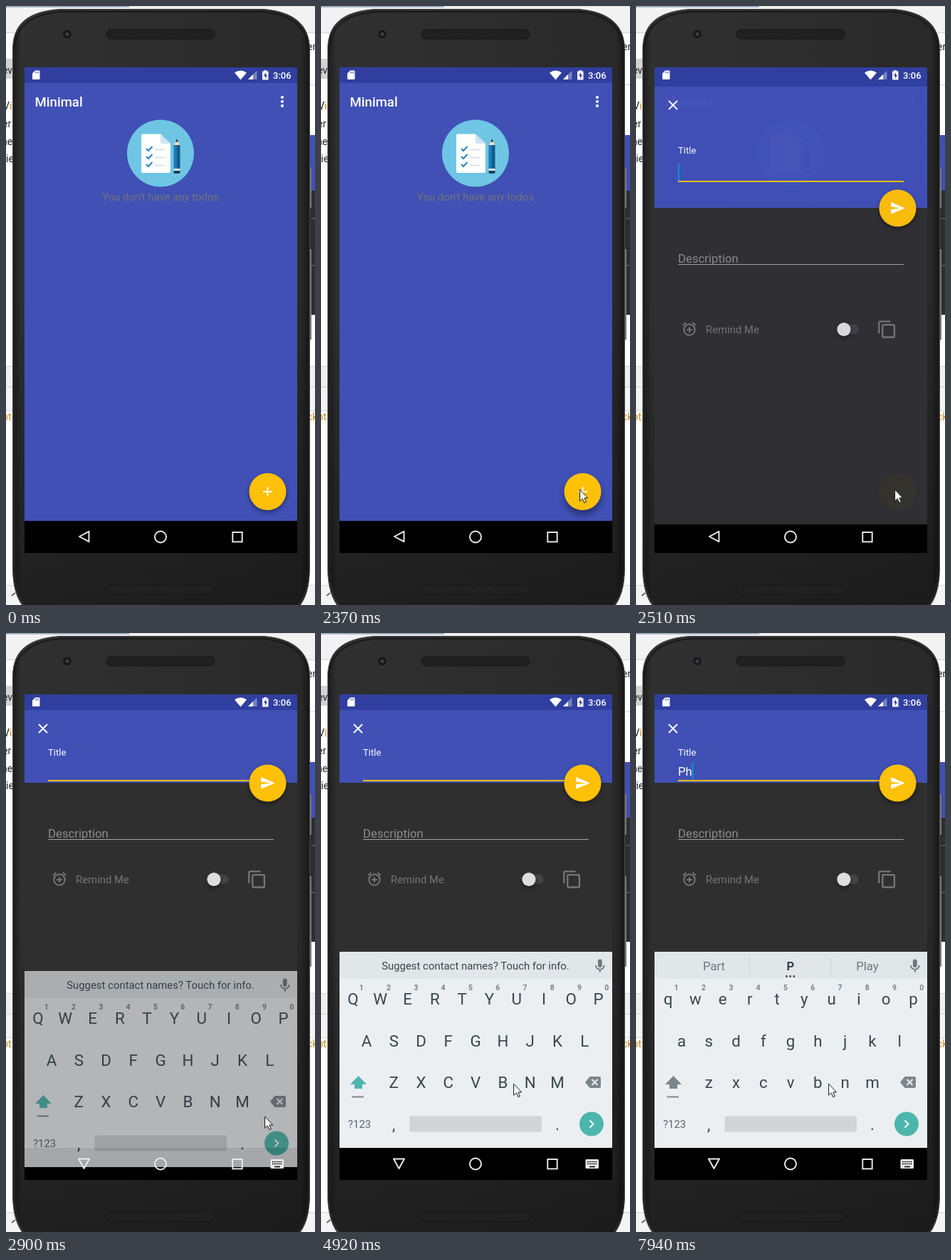
These frames come from a looping animation (434x840 px, 8 s). An HTML page:

```html
<!DOCTYPE html>
<html lang="en">
<head>
<meta charset="utf-8">
<title>Todo demo</title>
<style>
html, body { margin: 0; width: 100%; height: 100%; overflow: hidden; background: #fff; }
svg { display: block; width: 434px; height: 840px; }
text { font-family: Roboto, sans-serif; }
.mid { text-anchor: middle; }
.ide { font: 14px "Open Sans", sans-serif; }
.key { font-size: 22.4px; fill: #37474f; text-anchor: middle; }
.hint { font-size: 10.5px; font-weight: 700; fill: #75828a; text-anchor: middle; }
.sp14 { font-size: 13.04px; }
.sp16 { font-size: 14.9px; }
.sp18 { font-size: 16.77px; }
.fab { filter: drop-shadow(0 3px 3px #0006); }

/* every moving part shares one 8 s clock */
.a { animation: 8s step-end infinite; }
.lift { animation-name: lift; }
#form { animation-name: open; }
#keyboard { animation-name: rise; }
#caret { animation-name: blink; }
#caretX { animation-name: advance; }
#upper { animation-name: upper; }
.lower { animation-name: lower; }
#second { animation-name: second; }
#navBack { animation-name: navBack; }
#navDown { animation-name: navDown; }
#click { animation-name: click; }
#add { animation-name: press; }
#ripple { animation-name: ripple; }
#cursor { animation-name: point; }

@keyframes lift { 0% { transform: translateY(var(--d)); } 36.25%, 100% { transform: none; } }
@keyframes open {
  0% { opacity: 0; transform: translateY(54px); }
  30.375% { opacity: .69; transform: translateY(25px); }
  31.375% { opacity: .97; transform: translateY(5px); }
  33.5%, 100% { opacity: 1; transform: none; }
}
@keyframes rise {
  0% { opacity: 0; transform: translateY(60px); }
  36.25% { opacity: .7; transform: translateY(27px); }
  37.25% { opacity: .95; transform: translateY(6px); }
  38.25%, 100% { opacity: 1; transform: none; }
}
@keyframes blink {
  0%, 42.25%, 54.625%, 67.125%, 80%, 92.625%, 100% { opacity: 1; }
  36.25%, 48.25%, 61.5%, 73.125%, 86.625% { opacity: 0; }
}
@keyframes advance {
  0% { transform: none; }
  98.375% { transform: translateX(10.5px); }
  99.25%, 100% { transform: translateX(19.6px); }
}
@keyframes upper { 0% { opacity: 1; } 98.375%, 100% { opacity: 0; } }
@keyframes lower { 0% { opacity: 0; } 98.375%, 100% { opacity: 1; } }
@keyframes second { 0% { opacity: 0; } 99.25%, 100% { opacity: 1; } }
@keyframes navBack { 0% { opacity: 1; } 34.375%, 100% { opacity: 0; } }
@keyframes navDown { 0% { opacity: 0; } 34.375%, 100% { opacity: 1; } }
@keyframes click { 0%, 17.875%, 100% { opacity: 0; } 15.75% { opacity: 1; } }
@keyframes press {
  0% { filter: drop-shadow(0 3px 3px #0006); }
  23.75% { filter: drop-shadow(0 4px 4px #0006); }
  25.5%, 100% { filter: drop-shadow(0 6px 5px #0006); }
}
@keyframes ripple {
  0% { opacity: 0; transform: scale(0); }
  23.75% { opacity: .25; transform: scale(.2); animation-timing-function: steps(3); }
  26.5% { opacity: .25; transform: scale(1); animation-timing-function: steps(3); }
  29.5%, 100% { opacity: 0; transform: scale(1); }
}
@keyframes point {
  0% { transform: translate(445px, 810px); }
  2.25% { transform: translate(426px, 786px); animation-timing-function: steps(6); }
  7.5% { transform: translate(383px, 690px); animation-timing-function: steps(4); }
  11% { transform: translate(365px, 671px); }
  11.875% { transform: translate(363px, 677.5px); }
  43.125% { transform: translate(363px, 677.5px); animation-timing-function: steps(4); }
  46.875% { transform: translate(306px, 495.5px); animation-timing-function: steps(5); }
  51.75%, 100% { transform: translate(270px, 631.5px); }
}
</style>
</head>
<body>
<svg viewBox="0 0 434 840">
  <defs>
    <linearGradient id="shell" x2="1">
      <stop offset="0" stop-color="#1c1c1c"/><stop offset=".03" stop-color="#303030"/>
      <stop offset=".5" stop-color="#2d2d2d"/><stop offset=".97" stop-color="#292929"/>
      <stop offset="1" stop-color="#171717"/>
    </linearGradient>
    <linearGradient id="shade" x2="0" y2="1">
      <stop offset="0" stop-color="#000" stop-opacity="0"/><stop offset="1" stop-color="#000" stop-opacity=".35"/>
    </linearGradient>
    <pattern id="mesh" width="4" height="4" patternUnits="userSpaceOnUse">
      <rect width="4" height="4" fill="#191919"/>
      <circle cx="1" cy="1" r=".8" fill="#3a3a3a"/><circle cx="3" cy="3" r=".8" fill="#3a3a3a"/>
    </pattern>
    <clipPath id="screen"><rect x="26" y="86" width="383" height="681"/></clipPath>
    <clipPath id="window"><rect x="26" y="86" width="383" height="636"/></clipPath>
    <clipPath id="disc"><circle cx="367.5" cy="681" r="26"/></clipPath>
  </defs>

  <!-- desktop behind the phone -->
  <g id="desktop">
    <rect width="434" height="840" fill="#fff"/>
    <rect width="434" height="37" fill="#f2f2f2"/>
    <rect width="173" height="2" fill="#9fb0c4"/><rect x="173" width="261" height="1" fill="#dcdcdc"/>
    <path d="M0 37.5H434M400 110.5H434M0 505.5H434M0 534.5H434M0 567.5H434M0 812.5H434" stroke="#d2d2d2"/>
    <rect y="74" width="12" height="28" fill="#d3d3d3"/>
    <rect y="506" width="434" height="28" fill="#f0f0f0"/>
    <rect y="535" width="434" height="32" fill="#f4f4f4"/>
    <rect y="813" width="434" height="27" fill="#f4f4f4"/>
    <rect x="424" y="181" width="10" height="78" fill="#4050b5"/>
    <rect x="424" y="259" width="10" height="174" fill="#2e2e2e"/>
    <path d="M429 298h5M429 364h5" stroke="#777"/>
    <path d="M427.5 226V283M427.5 341V468" stroke="#777" stroke-width="3"/>
    <g class="ide" fill="#222">
      <text x="-5" y="95">ev</text>
      <text x="-4" y="145">V<tspan fill="#c9861a">i</tspan></text>
      <text x="-5" y="170">er</text><text x="-6" y="195">ne</text><text x="0" y="219">ie</text>
      <text x="423" y="62">er</text>
      <g fill="#c9861a"><text x="-5" y="581">ot</text><text x="423" y="581">ck</text></g>
    </g>
    <path d="M8 827l5-4" stroke="#666" stroke-width="2"/>
  </g>

  <!-- phone -->
  <g id="phone">
    <path id="body" d="M9.500 60C10 27 28 8 75 4.500H362C405 8 426 27 426.500 60V790C426 815 421 832 409 846H27C15 832 10 815 9.500 790Z" fill="url(#shell)" stroke="#4a4a4a"/>
    <path d="M12 62C13 31 31 12 76 8H361C403 12 423 31 424 62" fill="none" stroke="#191919" stroke-width="2"/>
    <path d="M13 400H423V790C422 815 418 832 406 846H30C18 832 14 815 13 790Z" fill="url(#shade)"/>
    <circle cx="86" cy="39.500" r="6.500" fill="#181818" stroke="#353535"/>
    <circle cx="86" cy="39.500" r="2.500" fill="#3b4048"/>
    <g fill="url(#mesh)" stroke="#161616">
      <rect x="141" y="33" width="152" height="13" rx="6.500"/>
      <rect x="141" y="812" width="152" height="13" rx="6.500"/>
    </g>
  </g>

  <g clip-path="url(#screen)">
    <rect x="26" y="86" width="383" height="681" fill="#000"/>

    <!-- list screen -->
    <g id="home">
      <rect x="26" y="86" width="383" height="636" fill="#4050b5"/>
      <rect x="26" y="86" width="383" height="22" fill="#303f9f"/>
      <text x="40.500" y="141" font-size="18.630" font-weight="500" fill="#fff">Minimal</text>
      <g fill="#fff"><circle cx="388" cy="128" r="2.100"/><circle cx="388" cy="134" r="2.100"/><circle cx="388" cy="140" r="2.100"/></g>
      <circle cx="217" cy="206.500" r="47" fill="#6ec5e4"/>
      <path d="M192 179.500H217L231 193V232a2 2 0 0 1-2 2H192a2 2 0 0 1-2-2V181.500a2 2 0 0 1 2-2Z" fill="#fff"/>
      <path d="M217 179.500L231 193H219a2 2 0 0 1-2-2Z" fill="#cfe3f2"/>
      <g fill="none">
        <path d="M197 200l3 3 5.500-6M197 211l3 3 5.500-6M197 222l3 3 5.500-6" stroke="#2b83c4" stroke-width="2"/>
        <path d="M209 201.500h14M209 212.500h14M209 223.500h14" stroke="#d3dbe2" stroke-width="1.500"/>
      </g>
      <path d="M235.500 196L240 186 244.500 196Z" fill="#f3dcb8"/>
      <path d="M238 190.500L240 186 242 190.500Z" fill="#17324d"/>
      <rect x="235.500" y="195" width="4.500" height="34" fill="#1f7ab8"/>
      <rect x="240" y="195" width="4.500" height="34" fill="#135a8c"/>
      <rect x="235.500" y="228" width="9" height="3" fill="#dfe6ea"/>
      <path d="M235.500 231h9v2a2 2 0 0 1-2 2h-5a2 2 0 0 1-2-2Z" fill="#16405f"/>
      <text x="217" y="273" class="sp16 mid" fill="#737379">You don't have any todos</text>
      <g id="add" class="a">
        <circle cx="367.500" cy="681" r="26" fill="#ffc107"/>
        <path d="M361 681h13M367.500 674.500v13" stroke="#fff" stroke-width="1.900"/>
        <g clip-path="url(#disc)"><g transform="translate(363 678)"><circle id="ripple" class="a" r="34" fill="#fff"/></g></g>
      </g>
    </g>

    <!-- edit screen -->
    <g id="form" class="a"><g clip-path="url(#window)">
      <rect x="26" y="86" width="383" height="636" fill="#2f2f30"/>
      <rect class="a lift" style="--d:68px" x="26" y="20" width="383" height="190" fill="#4050b5"/>
      <rect x="26" y="86" width="383" height="22" fill="#303f9f"/>
      <path d="M46 128l12 12M58 128l-12 12" stroke="#fff" stroke-width="1.900"/>
      <text class="a lift sp14" style="--d:30px" x="59" y="172" fill="#fff">Title</text>
      <rect class="a lift" style="--d:34px" x="59" y="206" width="317" height="2" fill="#ffc107"/>
      <g class="a lift" style="--d:35px">
        <text class="sp18" x="59" y="199.500" fill="#fff"><tspan class="hidden"></tspan></text>
        <text class="a lower sp18" x="59" y="199.500" fill="#fff">P</text>
        <text id="second" class="a sp18" x="69.500" y="199.500" fill="#fff">h</text>
        <g id="caretX" class="a"><rect id="caret" class="a" x="59" y="181" width="1.900" height="24" fill="#0a98da"/></g>
      </g>
      <g class="a lift" style="--d:68px">
        <text class="sp18" x="59" y="287" fill="#8d8d8d">Description</text>
        <path d="M59 289.500H376" stroke="#a2a2a2"/>
        <g class="fab"><circle cx="367.500" cy="210.500" r="26" fill="#ffc107"/></g>
        <path transform="translate(356.300 199.300) scale(.9316)" d="M2 21L23 12 2 3V10l15 2-15 2z" fill="#fff"/>
      </g>
      <g class="a lift" style="--d:103px">
        <g transform="translate(63.500 333.500) scale(.96)" fill="none" stroke="#777" stroke-width="2">
          <circle cx="12" cy="13" r="8"/><path d="M2.600 6.500l4.600-3.900M21.400 6.500l-4.600-3.900M12 9v8M8 13h8"/>
        </g>
        <text class="sp16" x="98" y="351" fill="#757575">Remind Me</text>
        <rect x="281" y="338.500" width="31.500" height="13.500" rx="6.700" fill="#424446"/>
        <g class="fab"><circle cx="292" cy="345.500" r="9.500" fill="#dedede"/></g>
        <g fill="none" stroke="#777" stroke-width="2.300">
          <rect x="346.300" y="339.200" width="16.600" height="17.300" rx="1.200"/>
          <path d="M341.300 351V336a1.700 1.700 0 0 1 1.700-1.700H357.500"/>
        </g>
      </g>
    </g></g>

    <!-- soft keyboard -->
    <g id="keyboard" class="a">
      <rect x="26" y="447" width="383" height="275" fill="#eceff2"/>
      <rect x="26" y="447" width="383" height="37.500" fill="#e1e6e9"/>
      <g transform="translate(380.300 455.500) scale(.96)" fill="#6d787e">
        <rect x="9" y="2" width="6" height="12" rx="3"/>
        <path d="M5.900 11a6.100 6.100 0 0 0 12.200 0M12 17v4" fill="none" stroke="#6d787e" stroke-width="1.900"/>
      </g>
      <g id="hints"></g>
      <g id="upper" class="a">
        <text class="sp16 mid" x="217" y="472" fill="#37474f">Suggest contact names? Touch for info.</text>
      </g>
      <g id="lower" class="a lower">
        <path d="M159.500 456V478M273.500 456V478" stroke="#ccd2d6"/>
        <g class="sp18 mid" fill="#6d787e">
          <text x="109.500" y="473">Part</text><text x="325" y="473">Play</text>
          <text x="217" y="473" font-weight="700" fill="#37474f">P</text>
        </g>
        <g fill="#37474f"><circle cx="211.500" cy="481.500" r="1.400"/><circle cx="216.700" cy="481.500" r="1.400"/><circle cx="222" cy="481.500" r="1.400"/></g>
      </g>
      <path d="M43.500 650.500H60" stroke="#7b868c" stroke-width="2"/>
      <path d="M371 630l6.500-8H391a2 2 0 0 1 2 2v12a2 2 0 0 1-2 2H377.500Z" fill="#7b868c"/>
      <path d="M380.500 626l8 8M388.500 626l-8 8" stroke="#eceff2" stroke-width="2"/>
      <text class="sp16" x="38" y="693.500" fill="#58666e">?123</text>
      <text class="key" x="102.300" y="697">,</text><text class="key" x="332" y="697">.</text>
      <rect x="124.500" y="677.500" width="185.500" height="22" rx="3" fill="#d0d4d7"/>
      <circle cx="380" cy="688.500" r="17" fill="#4db6ac"/>
      <path d="M377.500 683.500l5 5-5 5" fill="none" stroke="#fff" stroke-width="1.900"/>
    </g>

    <!-- system bars -->
    <g id="status" fill="#fff">
      <path d="M41 90.500H46.500a1 1 0 0 1 1 1V102a1 1 0 0 1-1 1H38a1 1 0 0 1-1-1V94.500Z"/>
      <path d="M41.500 92v2.500M43.500 92v2.500M45.500 92v2.500" stroke="#303f9f" stroke-width=".8"/>
      <path d="M321 93.500Q329.500 87.500 338 93.500L329.500 103.500Z"/>
      <path d="M352.500 90.500V103H340Z" opacity=".35"/><path d="M347 96V103H340Z"/>
      <path d="M362.500 91.500V90h3.500v1.500H368.500V103.500H360V91.500Z"/>
      <path d="M365 93l-3 5h2v4l3-5.500h-2Z" fill="#303f9f"/>
      <text class="sp14" x="375" y="102" font-weight="500">3:06</text>
    </g>
    <g id="nav" fill="none" stroke="#ececec" stroke-width="1.900">
      <path id="navBack" class="a" d="M103 744L116.500 736.800V751.200Z" stroke-linejoin="round"/>
      <g id="navDown" class="a">
        <path d="M102 737.500H117L109.500 751Z" stroke-linejoin="round"/>
        <rect x="371.500" y="738" width="18.500" height="13" rx="1.500" fill="#ececec" stroke="none"/>
        <path d="M374 741.500H388M374 744.500H388" stroke="#000" stroke-width="1.600" stroke-dasharray="1.800 1.100"/>
        <path d="M377 748.500H385" stroke="#000" stroke-width="1.600"/>
      </g>
      <circle cx="217" cy="744.500" r="8"/><rect x="318.300" y="738" width="13.400" height="13.400"/>
    </g>
  </g>

  <g id="click" class="a" fill="none">
    <circle cx="363" cy="678" r="14" stroke="#000"/><circle cx="363" cy="678" r="13" stroke="#fff"/>
  </g>
  <g id="cursor" class="a">
    <path d="M.6 .8V16.800L4.300 13.400 6.900 19.200 9.400 18.100 6.900 12.400H11.700Z" fill="#fff" stroke="#111"/>
  </g>
</svg>
<script>
const PITCH = 38.28;
const ROWS = [["qwertyuiop", 45, 521], ["asdfghjkl", 64, 580], ["zxcvbnm", 102.3, 638]];
const byId = id => document.getElementById(id);
const label = (cls, x, y, s) => `<text class="${cls}" x="${x.toFixed(1)}" y="${y}">${s}</text>`;
const keys = change => ROWS.map(([row, x, y]) =>
  [...row].map((c, i) => label("key", x + i * PITCH, y, change(c))).join("")).join("");
const shift = color => `<path d="M41 633L52.500 621 64 633H58V639H47V633Z" fill="${color}"/>`;

byId("upper").innerHTML += keys(c => c.toUpperCase()) + shift("#4db6ac");
byId("lower").innerHTML += keys(c => c) + shift("#7b868c");
byId("hints").innerHTML = [..."1234567890"].map((d, i) => label("hint", 56.8 + i * PITCH, 501, d)).join("");
</script>
</body>
</html>
```
